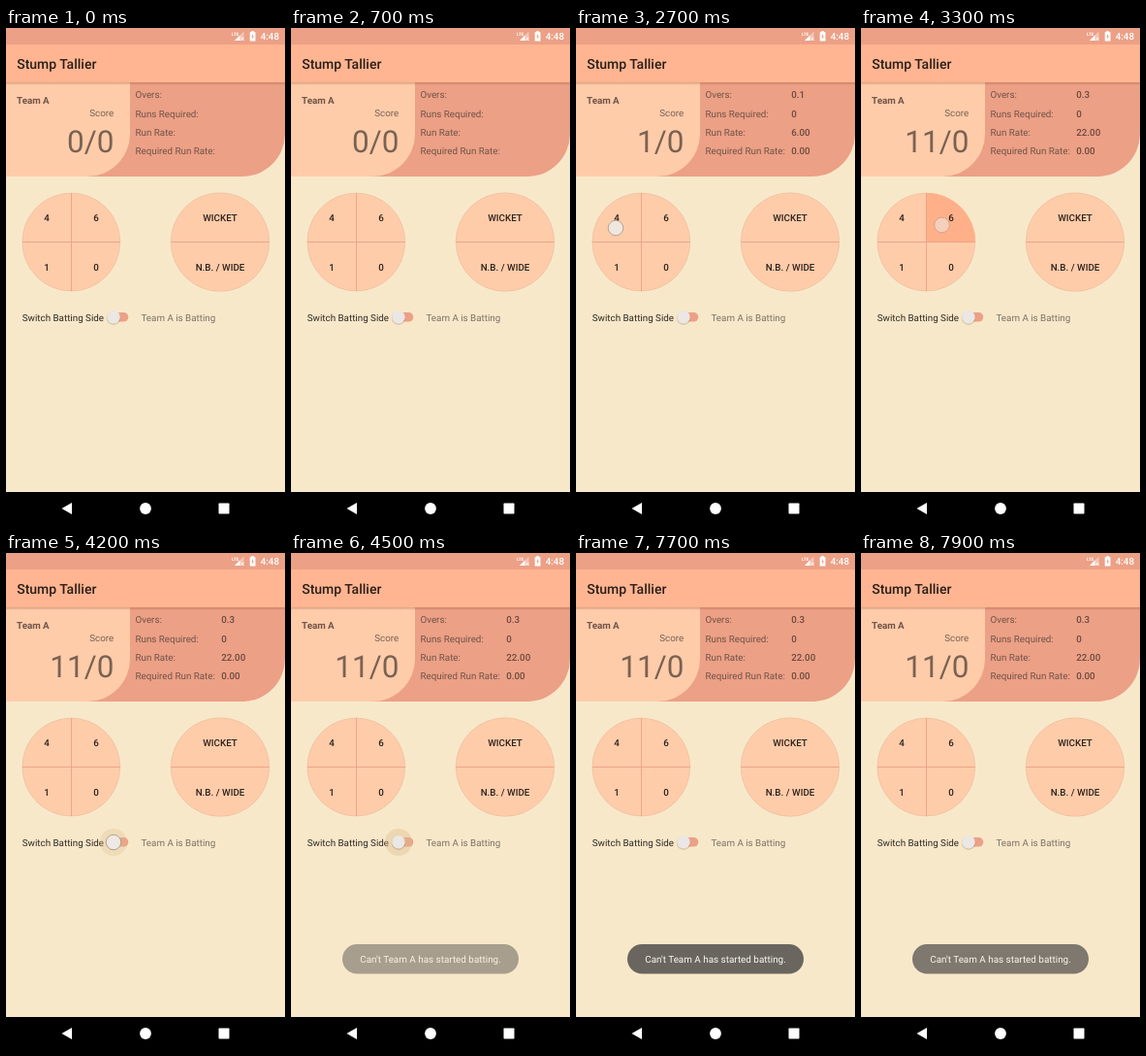
An HTML page that plays this animation: 288x512 px, repeating every 8 s.

```html
<!DOCTYPE html>
<html lang="en">
<head>
<meta charset="utf-8">
<title>Stump Tallier</title>
<style>
  html, body { margin: 0; width: 100%; height: 100%; overflow: hidden; background: #f8e8ca; }
  svg { display: block; width: 288px; height: 512px; }
  text { font: 400 9.8px Roboto, sans-serif; fill: #705447; text-rendering: geometricPrecision; }
  .bold { font-weight: 700; }
  .mid { font-weight: 500; fill: #2c211b; text-anchor: middle; }
  .value { font-weight: 500; fill: #6b4a3d; }
  .end { text-anchor: end; fill: #7a6252; }
  .score { font-size: 31.5px; }
</style>
</head>
<body>
<svg viewBox="0 0 288 512">
  <defs>
    <clipPath id="pad"><circle cx="67.3" cy="220.5" r="50.7"/></clipPath>
    <linearGradient id="shade" x2="0" y2="1">
      <stop stop-color="#7a3c20" stop-opacity=".3"/>
      <stop offset="1" stop-color="#7a3c20" stop-opacity="0"/>
    </linearGradient>
  </defs>
  <rect width="288" height="512" fill="#f8e8ca"/>

  <!-- score panels -->
  <path d="M0 56H288V109A44 44 0 0 1 244 153H0Z" fill="#eca086"/>
  <path d="M0 56H128V109A44 44 0 0 1 84 153H0Z" fill="#ffccaa"/>
  <text class="bold" x="11" y="77.7">Team A</text>
  <text class="end" x="111.2" y="91.3">Score</text>
  <text class="end score" id="score" x="111.4" y="128.2">0/0</text>
  <g id="stats"></g>

  <!-- bars -->
  <rect width="288" height="17" fill="#eca086"/>
  <rect y="17" width="288" height="39" fill="#ffb591"/>
  <rect y="56" width="288" height="3" fill="url(#shade)"/>
  <text x="11.2" y="42" style="font-size:14px;font-weight:500;fill:#2b1e18">Stump Tallier</text>
  <text x="233" y="8" style="font-size:4.6px;font-weight:700;fill:#fff">LTE</text>
  <path d="M236 13L245.5 3.5V13Z" fill="#fff" opacity=".4"/>
  <path d="M236 13L241.5 7.5V13Z" fill="#fff"/>
  <path d="M242.6 9.8l3 3m0-3l-3 3" stroke="#fff" stroke-width=".9"/>
  <path d="M251.7 4.2h1.6V3h2.6v1.2h1.6v9.3h-5.8Z" fill="#fff"/>
  <path d="M255 5.8l-1.6 3.4h1v2.6l1.6-3.4h-1Z" fill="#eca086"/>
  <text x="262.7" y="12.2" style="font-weight:500;fill:#fff">4:48</text>

  <!-- run buttons -->
  <g fill="#ffccaa" stroke="#c99670" stroke-opacity=".35" stroke-width=".7">
    <circle cx="67.3" cy="220.5" r="50.5"/>
    <circle cx="221" cy="220.5" r="50.8"/>
  </g>
  <g clip-path="url(#pad)"><rect id="press" width="51" height="50.5" fill="#ffb089" opacity="0"/></g>
  <path d="M67.5 170V271M17 220.5H118M170.3 220.5H271.7" stroke="#eca086" stroke-width=".9"/>
  <g id="keys"></g>

  <!-- batting switch -->
  <text x="16.8" y="301.5" style="fill:#2e2922">Switch Batting Side</text>
  <text x="139.5" y="301.5" style="fill:#7b7265">Team A is Batting</text>
  <rect x="106.5" y="293" width="19.8" height="9.6" rx="4.8" fill="#eca086"/>
  <circle id="ripple" cx="111" cy="298" r="14" fill="#d9bd8e" opacity="0"/>
  <circle cx="111" cy="298.7" r="7.2" fill="#6b5030" opacity=".22"/>
  <circle cx="111" cy="297.8" r="6.8" fill="#ebe7e4"/>

  <circle id="finger" r="7.8" fill="#eeeae4" stroke="#a08f82" stroke-width=".8" opacity="0"/>

  <g id="toast" opacity="0">
    <rect x="53" y="403" width="182" height="30.5" rx="15.2" fill="#66625c"/>
    <text x="144" y="421.8" text-anchor="middle" style="font-size:9.9px;fill:#fbfaf8">Can't Team A has started batting.</text>
  </g>

  <!-- navigation -->
  <rect y="478" width="288" height="34" fill="#000"/>
  <g fill="#fff">
    <path d="M57.5 495L68 489V501Z"/>
    <circle cx="144" cy="495" r="5.9"/>
    <rect x="219.5" y="489.5" width="11" height="11" rx=".8"/>
  </g>
</svg>
<script>
const LOOP = 8000, STEP = 100;
const $ = id => document.getElementById(id);

function label(parent, x, y, str, cls = '') {
  const el = document.createElementNS('http://www.w3.org/2000/svg', 'text');
  el.setAttribute('x', x);
  el.setAttribute('y', y);
  el.setAttribute('class', cls);
  el.textContent = str;
  return $(parent).appendChild(el);
}

const values = ['Overs:', 'Runs Required:', 'Run Rate:', 'Required Run Rate:'].map((name, i) => {
  const y = 72.3 + i * 19.2;
  label('stats', 133.5, y, name);
  return label('stats', 222.2, y, '', 'value');
});

[['4', 42, 199], ['6', 93, 199], ['1', 42, 250], ['0', 93, 250],
 ['WICKET', 221, 199], ['N.B. / WIDE', 221, 250]]
  .forEach(([str, x, y]) => label('keys', x, y, str, 'mid'));

// start time, finger position, quadrant corner, runs scored
const taps = [
  { at: 2200, x: 42, y: 249, qx: 16.5, qy: 220.5, runs: 1 },
  { at: 2700, x: 41, y: 206, qx: 16.5, qy: 170, runs: 4 },
  { at: 3100, x: 83.5, y: 203, qx: 67.5, qy: 170, runs: 6 }
];
const SWITCH = { at: 4100, x: 111, y: 298 };

// opacities in 100 ms steps from the start of a tap
const FINGER = [.9, .9, .55], PRESS = [0, .7, 1, .45];
const RIPPLE = [0, .3, .45, .45, .4, .25, .1];
const TOAST_IN = [0, .3, .55, .75, .88, .96], TOAST_OUT = [.97, .92, .83];

const level = (list, t, start, rest = 0) => list[Math.floor((t - start) / STEP)] ?? rest;
const fade = (id, v) => $(id).setAttribute('opacity', v);
const move = (id, x, y) => $(id).setAttribute('transform', `translate(${x} ${y})`);

function showScore(t) {
  const done = taps.filter(p => t >= p.at + 2 * STEP);
  const balls = done.length;
  const runs = done.reduce((sum, p) => sum + p.runs, 0);
  $('score').textContent = runs + '/0';
  const stats = balls ? ['0.' + balls, '0', (runs * 6 / balls).toFixed(2), '0.00'] : [];
  values.forEach((el, i) => el.textContent = stats[i] ?? '');
}

function draw(now) {
  const t = Math.floor(now % LOOP / STEP) * STEP;
  showScore(t);

  const tap = [...taps, SWITCH].filter(p => t >= p.at).pop();
  fade('finger', tap ? level(FINGER, t, tap.at) : 0);
  fade('press', tap && tap.runs ? level(PRESS, t, tap.at) : 0);
  if (tap) move('finger', tap.x, tap.y);
  if (tap && tap.runs) move('press', tap.qx, tap.qy);

  fade('ripple', level(RIPPLE, t, SWITCH.at));
  const shown = t >= 7700 ? level(TOAST_OUT, t, 7700)
    : t >= 4300 ? level(TOAST_IN, t, 4300, 1) : 0;
  fade('toast', shown);
}

const start = performance.now();
function tick() {
  draw(performance.now() - start);
  requestAnimationFrame(tick);
}
tick();
</script>
</body>
</html>
```
